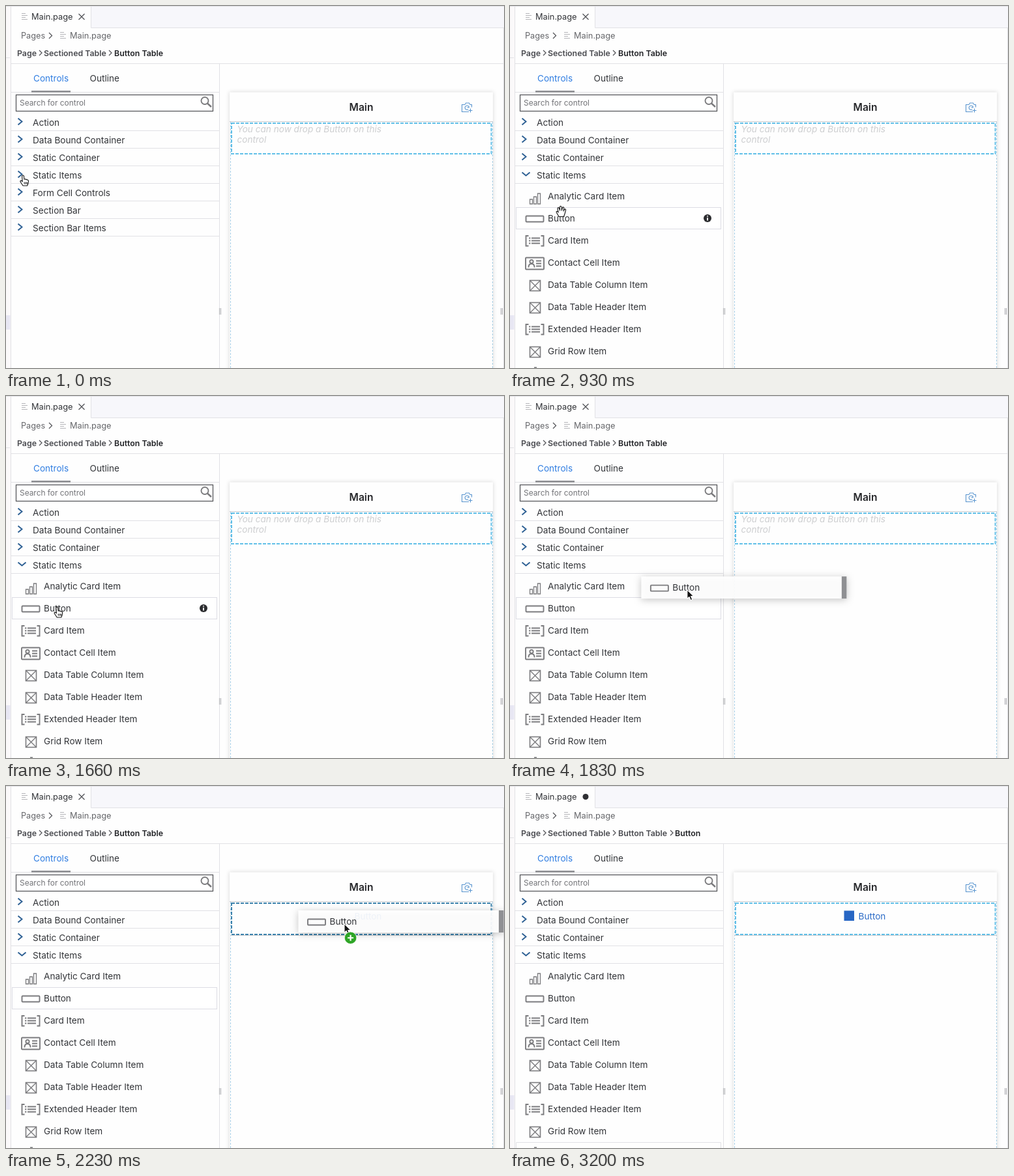
Write an HTML page that moves like this. It is 764 px wide and 556 px high and loops after 3830 ms.

```html
<!DOCTYPE html>
<html lang="en">
<head>
<meta charset="utf-8">
<title>Drag a control</title>
<style>
html, body { margin: 0; width: 100%; height: 100%; overflow: hidden; background: #fefefe; }
svg { display: block; width: 764px; height: 556px; font: 13.6px Inter, "Liberation Sans", sans-serif; }
text { fill: #323438; white-space: pre; }
.line { fill: none; stroke: #e1e1e5; }
.icon { fill: none; stroke: #7b7b7e; stroke-width: 1.9; }
.file { fill: none; stroke: #b4b4b8; stroke-width: 1; }
.chev { fill: none; stroke: #2c5f93; stroke-width: 1.9; }
.crumb { font-size: 12.35px; font-weight: 600; fill: #4a4b50; }
.sep { fill: none; stroke: #55565a; stroke-width: 1.3; }
.hand { fill: #fff; stroke: #111; stroke-width: 1.1; stroke-linejoin: round; }
.hint { fill: #cdced0; font-style: italic; }
.card { filter: drop-shadow(0 0 3px rgba(0, 0, 0, .16)); }
#ghost .box { filter: drop-shadow(0 2px 6px rgba(0, 0, 0, .25)); }
</style>
</head>
<body>
<svg id="stage" viewBox="0 0 764 556"></svg>
<script>
const LOOP = 3830;
const OPEN = 30, GRAB = 930, PRESS = 1530, DRAG = 1730, DROP = 2330, CRUMB = 2500, DIRTY = 3060, LEAVE = 3140;

// time, x and y of the cursor tip
const path = [
  [0, 26, 260], [330, 27, 261], [929, 27, 261], [930, 78, 308], [1430, 78, 324],
  [1660, 78, 324], [1730, 90, 322], [1830, 270, 298], [1930, 455.5, 265], [2030, 502, 238],
  [2230, 519, 211.5], [2330, 518, 214], [2500, 505, 231], [3000, 505, 231],
  [3060, 470, 300], [3200, 300, 580], [LOOP, 300, 580]
];

const text = (x, y, s, attrs = '') => `<text x="${x}" y="${y}" ${attrs}>${s}</text>`;
const draw = (d, cls = 'line', attrs = '') => `<path d="${d}" class="${cls}" ${attrs}/>`;
const rect = (x, y, w, h, attrs) => `<rect x="${x}" y="${y}" width="${w}" height="${h}" ${attrs}/>`;
const group = (id, body) => `<g id="${id}">${body}</g>`;
const fileIcon = (x, y) => draw(`M${x} ${y + .5}h6M${x} ${y + 3.5}h9M${x} ${y + 6.5}h6M${x} ${y + 9.5}h9`, 'file');
const sep = x => draw(`M${x} 68l4 4-4 4`, 'sep');

// Icons are drawn around (38, 0), the middle of a row
const icons = {
  bars: draw('M30.5 12v-7h4v7zM36.5 12v-11h4v11zM42.5 12v-16h4v16z', 'icon', 'style="stroke-width:1.3"'),
  button: rect(24.5, -3.5, 27, 9, 'rx="1" class="icon"'),
  card: draw('M28.5-7h-4v15.5h4M47.5-7h4v15.5h-4M33-3.5h13M33 .5h13M33 4.5h13', 'icon') +
    draw('M29-3.5h2.4M29 .5h2.4M29 4.5h2.4', 'icon'),
  contact: rect(24, -7.5, 28, 18, 'rx="1" class="icon"') + '<circle cx="33" cy="-1.5" r="2.6" class="icon"/>' +
    draw('M28.5 7.5q0-5.5 4.5-5.5t4.5 5.5M40-2.5h8M40 1.5h8M40 5.5h8', 'icon'),
  cross: rect(30.5, -6.5, 16, 16, 'class="icon" style="stroke-width:1.6"') +
    draw('M30.5-6.5l16 16M46.5-6.5l-16 16', 'icon', 'style="stroke-width:1.4"')
};

const headers = ['Action', 'Data Bound Container', 'Static Container', 'Static Items',
  'Form Cell Controls', 'Section Bar', 'Section Bar Items'];
const items = [['Analytic Card Item', 'bars'], ['Button', 'button'], ['Card Item', 'card'],
  ['Contact Cell Item', 'contact'], ['Data Table Column Item', 'cross'], ['Data Table Header Item', 'cross'],
  ['Extended Header Item', 'card'], ['Grid Row Item', 'cross']];

const header = (name, i) => text(41, 183.5 + 27 * i, name) + draw(`M7 ${191.5 + 27 * i}H327`);
const closed = i => draw(`M18.5 ${172.5 + 27 * i}l6 5-6 5`, 'chev');
const item = ([name, icon], i) =>
  `<g transform="translate(0 ${292 + 34 * i})">${icons[icon]}${text(58, 5, name)}</g>`;

const frame =
  rect(0, 0, 7, 556, 'fill="#fbf9fa"') + rect(0, 475, 6.5, 22, 'fill="#e8e7f3"') + draw('M0 79.5H6') +
  rect(130, 0, 634, 33, 'fill="#f7f7fb"') +
  draw('M0 .5H764M130.5 0V33.5H764M7.5 0V556M763.5 33V556M7 88.5H764M7 132.5H327M327.5 88V556') +
  fileIcon(24, 11) + text(39, 21, 'Main.page', 'font-size="12.8"') +
  text(23, 50, 'Pages', 'font-size="12.7" style="fill:#66676b"') + draw('M66 41l4.5 4.5-4.5 4.5', 'sep') +
  fileIcon(83, 40) + text(98, 50, 'Main.page', 'font-size="12.8" style="fill:#66676b"') +
  text(17, 76.5, 'Page', 'class="crumb"') + sep(51) + text(58, 76.5, 'Sectioned Table', 'class="crumb"') + sep(158) +
  text(166, 76.5, 'Button Table', 'class="crumb" id="table"') +
  group('crumb', sep(246) + text(253, 76.5, 'Button', 'class="crumb" style="fill:#222327"'));

const panel =
  text(42, 116, 'Controls', 'style="fill:#2f7de1"') + text(128.5, 116, 'Outline') +
  rect(39, 130, 60, 2.6, 'fill="#8d8e92"') +
  rect(15.5, 136.5, 302, 25, 'fill="#fff" stroke="#58595d" stroke-width="1.3"') +
  text(21, 153, 'Search for control', 'font-size="11.9" style="fill:#727377"') +
  '<circle cx="305" cy="145.5" r="5.5" class="icon"/>' + draw('M309 149.5l6 5.5', 'icon', 'style="stroke-width:2.4"') +
  headers.slice(0, 4).map(header).join('') + [0, 1, 2].map(closed).join('') +
  group('shut', headers.map((h, i) => i > 3 ? header(h, i) + closed(i) : '').join('') + closed(3)) +
  group('open', draw('M18.5 255.5l6 5 6-5', 'chev') +
    rect(9.5, 309.5, 314, 33, 'id="hover" fill="#fff" stroke="#dcdce4"') +
    items.map(item).join('') + rect(37, 554.5, 4, 2, 'fill="#77787b"') +
    group('info', '<circle cx="303" cy="326" r="6" fill="#2b2c2f"/>' +
      draw('M303 325v4.5M303 322v1.6', 'icon', 'style="stroke:#fff"')) +
    draw('M9.5 556V547.5H323.5V556', 'line', 'id="last"'));

const camera = draw('M704 151.5l1.5-2.5h5l1.5 2.5h2.5v4M710 162.5h-10.5v-11h4.5M710.5 156a3.2 3.2 0 1 0-1.5 3M710 153.5v2.5h-2.5M709.5 160.5h6M712.5 157.5v6',
  'icon', 'style="stroke:#5b96cf;stroke-width:1.1"');
const grip = x => draw(`M${x} 464v10M${x + 2} 464v10`, 'line', 'style="stroke:#a9aaae"');

const canvas =
  rect(343, 132.5, 404, 440, 'fill="#fefefe" class="card"') +
  text(545, 161, 'Main', 'font-size="15.6" font-weight="600" text-anchor="middle" style="fill:#26272a"') + camera +
  draw('M343 177.5H747', 'line', 'style="stroke:#c9ccd0"') +
  draw('M344.5 178V556M746.5 178V556', 'line', 'stroke-dasharray="3 2" style="stroke:#a9cfe6"') +
  group('hint', text(354.5, 193.5, 'You can now drop a Button on this', 'class="hint"') + text(354.5, 210, 'control', 'class="hint"')) +
  group('placed', rect(512.5, 191.5, 15.5, 15.5, 'id="badge" fill="#2766c4"') + text(534.5, 204.5, 'Button', 'style="fill:#2c6bc6"') +
    draw('M344 229.5H747', 'line', 'style="stroke:#c9ccd0"')) +
  rect(346, 180, 398.5, 47, 'id="zone" fill="none" stroke-width="2" stroke-dasharray="5 2"') +
  grip(327.5) + grip(759.5);

const ghost = group('ghost',
  rect(0, 0, 315, 34, 'class="box" fill="#fff" fill-opacity=".92"') +
  rect(307.5, 0, 7.5, 34, 'fill="#8f9093"') +
  `<g transform="translate(-10 17)">${icons.button}${text(58, 5, 'Button')}</g>`);

const cursor = group('cursor',
  group('point', draw('M-1.4 1q1.4-2 2.8 0L2 6.2q1.5-1 2.3.4 1.5-.8 2.2.6 1.8-.4 2 1.4L8.2 12 6.6 16H0L-3.4 10.8q-1.4-2 0-2.6 1.4-.3 2.6 1.6z', 'hand') +
    draw('M2.2 10.5v3M4.4 10.5v3M6.3 10.5v3', 'hand', 'fill-opacity="0" stroke-width=".8"')) +
  group('palm', draw('M-3 15.5L-6.5 9.5q-1-2 .4-2.3 1.2 0 2.3 1.8L-5 3.3q0-1.8 1.3-1.7 1 .2 1.4 1.7L-1.4 6-1.6.9Q-1.3-.8 0-.6 1.2-.4 1.2 1.2L1.4 6 2.4 1.9Q3 .5 4.1 1q1 .5.6 2.2L4.2 7 5.4 4.6q1-1.2 1.8-.4.7.7.2 2L5.8 12 4.4 15.5z', 'hand')) +
  group('arrow', draw('M0 0V13.8L3.1 10.9 5.3 16 7.9 14.9 5.7 9.9H9.9z', 'hand', 'style="fill:#111;stroke:#fff"')) +
  group('plus', '<circle cx="9.6" cy="21.7" r="9.3" fill="#2ea526" stroke="#fff" stroke-width=".8"/>' +
    draw('M5.1 21.7h9M9.6 17.2v9', 'hand', 'style="stroke:#fff;stroke-width:2.2"')));

document.getElementById('stage').innerHTML = frame + panel + canvas + ghost +
  group('close', draw('M111.5 12l9 9M120.5 12l-9 9', 'sep')) +
  '<circle id="dot" cx="116" cy="16.5" r="4.5" fill="#2f3034"/>' + cursor;

const parts = {};
document.querySelectorAll('#stage [id]').forEach(el => parts[el.id] = el);
const show = (id, on) => { parts[id].style.display = on ? '' : 'none'; };
const move = (id, x, y) => parts[id].setAttribute('transform', `translate(${x.toFixed(2)} ${y.toFixed(2)})`);

function tip(t) {
  const i = Math.max(1, path.findIndex(p => p[0] > t));
  const [t0, x0, y0] = path[i - 1], [t1, x1, y1] = path[i];
  const k = (t - t0) / (t1 - t0);
  return [x0 + (x1 - x0) * k, y0 + (y1 - y0) * k];
}

function render(t) {
  const [x, y] = tip(t);
  const drag = t >= DRAG && t < DROP;
  const over = drag && y < 228;
  const dropped = t >= DROP;
  show('shut', t < OPEN);
  show('open', t >= OPEN);
  show('hover', t >= GRAB && !dropped);
  show('info', t >= GRAB && t < DRAG);
  show('last', t >= LEAVE);
  show('crumb', t >= CRUMB);
  parts.table.style.fill = t < CRUMB ? '#222327' : '#4a4b50';
  show('close', t < DIRTY);
  show('dot', t >= DIRTY);
  show('hint', !over && !dropped);
  show('placed', over || dropped);
  show('badge', dropped);
  parts.zone.setAttribute('height', over || dropped ? 48 : 47);
  parts.zone.setAttribute('stroke', over ? '#3d83ad' : drag && x > 343 ? '#468fc2' : '#62c0e8');
  show('ghost', drag);
  move('ghost', x - 70.5, y - 20.5);
  show('point', t < GRAB || t >= PRESS && t < DRAG);
  show('palm', t >= GRAB && t < PRESS);
  show('arrow', t >= DRAG);
  show('plus', drag && x > 343);
  move('cursor', x, y);
}

const start = performance.now();
function tick() {
  render((performance.now() - start) % LOOP);
  requestAnimationFrame(tick);
}
tick();
</script>
</body>
</html>
```
